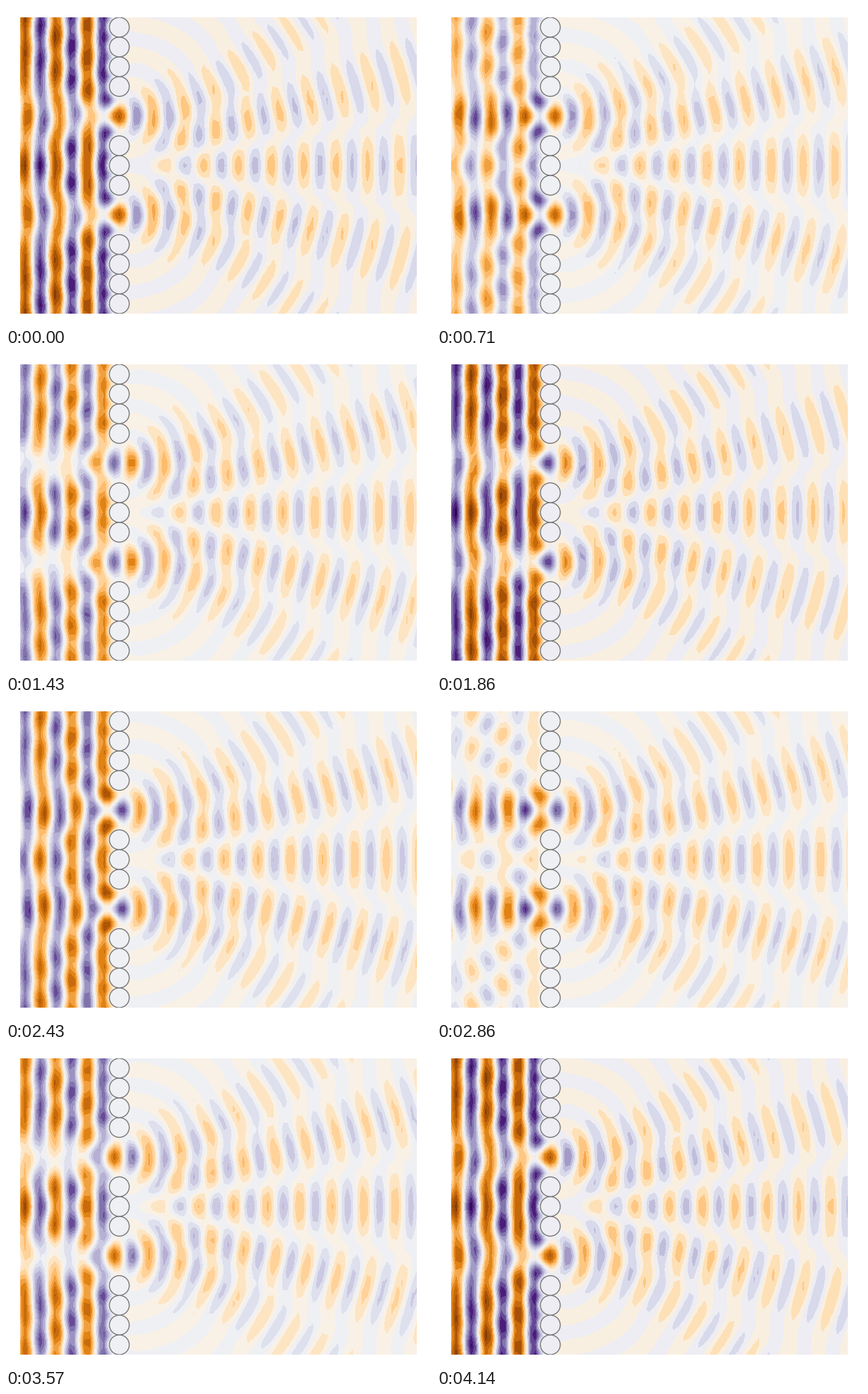
A matplotlib script for the animation above (4280 ms loop, 600x450 px).

```python
import numpy as np
import matplotlib.pyplot as plt
from matplotlib.animation import FuncAnimation
from matplotlib.patches import Circle

W, H, DPI = 600, 450, 100
FRAMES, LOOP = 30, 4280
K = 2.0                      # wavenumber of the incident plane wave
RES = 80                     # grid cells per axis
X0, X1, Y1 = -10, 30, 15

# A wall of touching unit cylinders at x = 0 with two openings.
WALL = [2.0 * i for i in range(-30, 31) if abs(i) not in (2, 3)]

# Slowly varying factor of the Hankel function H0, tabulated once.
TAB_X = np.arange(0.3, 320, 0.005)
TAB_A = sum(0.25 * np.exp(-s * s) / np.sqrt(1 + 0.5j * s * s / TAB_X)
            for s in np.arange(-6, 6.01, 0.25)) / np.sqrt(np.pi)


def hankel0(x):
    x = np.maximum(x, 0.3)
    wave = np.sqrt(2 / (np.pi * x)) * np.exp(1j * (x - np.pi / 4))
    return wave * np.interp(x, TAB_X, TAB_A)


def rings(radius, count):
    """Complex points on a ring inside or on every cylinder."""
    ring = radius * np.exp(2j * np.pi * np.arange(count) / count)
    return (1j * np.array(WALL)[:, None] + ring).ravel()


def solve_strengths(sources):
    """Source strengths that make the total field vanish on the cylinders."""
    edge = rings(1.0, 34)
    a = hankel0(K * np.abs(edge[:, None] - sources))
    gram = a.conj().T @ a
    gram += 1e-10 * np.trace(gram).real / len(gram) * np.eye(len(gram))
    return np.linalg.solve(gram, -a.conj().T @ np.exp(1j * K * edge.real))


def total_field(xs, ys):
    """Complex field for the upper half plane, mirrored to the lower one."""
    sources = rings(0.5, 18)
    strengths = solve_strengths(sources)
    rows = []
    for y in ys[ys > -1e-9]:
        p = xs + 1j * y
        row = np.exp(1j * K * xs)
        row = row + hankel0(K * np.abs(p[:, None] - sources)) @ strengths
        for c in WALL:
            row[np.abs(p - 1j * c) <= 1] = 0
        rows.append(row)
    upper = np.array(rows)
    return np.vstack([upper[:0:-1], upper])


xs = np.linspace(X0, X1, RES + 1)
ys = np.linspace(-Y1, Y1, RES + 1)
field = total_field(xs, ys)
limit = round(float(np.abs(field.real).max()), 1)

fig = plt.figure(figsize=(W / DPI, H / DPI), dpi=DPI, facecolor="white")
ax = fig.add_axes([20 / W, 16 / H, 560 / W, 418 / H])


def draw(n):
    ax.clear()
    ax.axis("off")
    phase = 2 * np.pi * n / (FRAMES - 1)
    z = (field * np.exp(-1j * phase)).real
    cs = ax.contourf(xs, ys, z, 15, cmap="PuOr_r", vmin=-limit, vmax=limit)
    step = cs.levels[1] - cs.levels[0]
    still = cs.cmap(cs.norm(-step / 2))
    for c in WALL:
        if abs(c) < Y1:
            ax.add_patch(Circle((0, c), 1, facecolor=still, edgecolor="0.45",
                                linewidth=0.95, zorder=3))
    ax.set_xlim(X0, X1)
    ax.set_ylim(-Y1, Y1)
    return []


anim = FuncAnimation(fig, draw, frames=FRAMES, interval=LOOP / FRAMES,
                     init_func=lambda: draw(0), repeat=True, repeat_delay=0)
plt.show()
```
